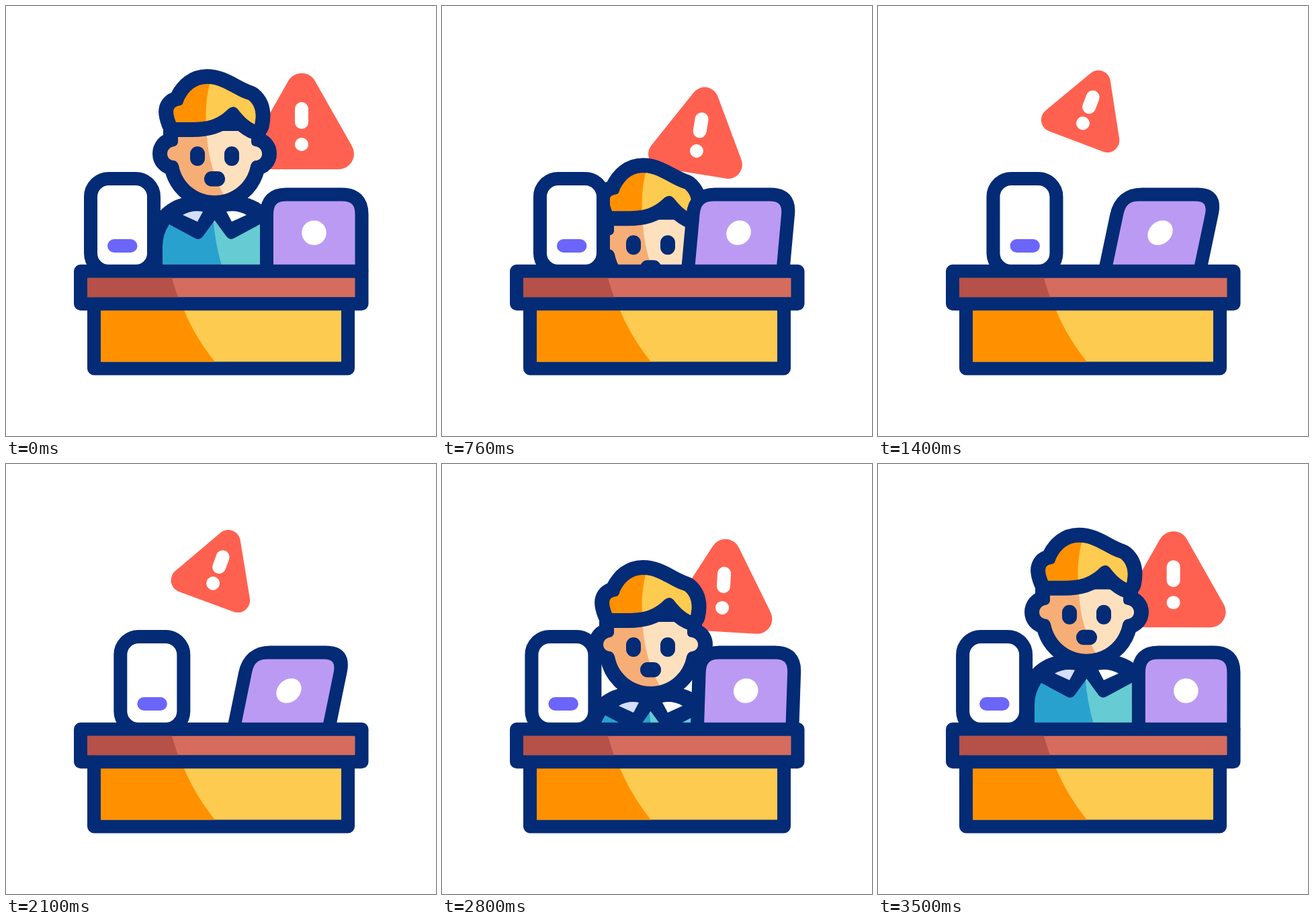
An HTML page that plays this animation: 640 px wide and 640 px high, repeating every 3600 ms.

```html
<!DOCTYPE html>
<html lang="en">
<head>
<meta charset="utf-8">
<title>Hiding behind the desk</title>
<style>
  html, body { margin: 0; width: 100%; height: 100%; overflow: hidden; background: #fff; }
  svg { display: block; width: 100vw; height: 100vh; }
  .navy { fill: #042b75; }
  .line { stroke: #042b75; stroke-width: 20; stroke-linejoin: round; }
  .thick { stroke: #042b75; stroke-width: 44; stroke-linejoin: round; }
</style>
</head>
<body>
<svg viewBox="0 0 640 640">
  <defs>
    <clipPath id="aboveDesk"><path d="M0 0H640V395H0Z"/></clipPath>
    <clipPath id="headLight"><path d="M305 90L303 116C296 145 297 170 299 195C302 230 311 258 325 283L420 290V90Z"/></clipPath>
    <clipPath id="bodyLight"><path d="M308 310Q310 350 322 390L326 405H420V310Z"/></clipPath>
    <path id="face" d="M256 186V203Q255 208 250 209C236.700 211 236.700 229 250 230Q255 231 257 237C262 264 285 282 310.500 282C336 282 359 264 364 237Q366 231 371 230C384.300 229 384.300 211 371 209Q365 208 365 203V186Z"/>
    <path id="hair" d="M253 173C248 160 247 152 255 149C262 147 262 149 265 140C272 126 283 116 299 116C322 116 338 133 361 140C372 149 373 162 370 176C362 172 354 165 347 156Q340 146 331 153C314 170 297 173 277 173Z"/>
    <path id="body" d="M233 405V358Q233 340 243 325L282 346Q288 349 293 343L310.500 319L328 343Q333 349 339 346L378 325Q388 340 388 358V405Z"/>
  </defs>

  <g id="alert">
    <path id="sign" fill="#ff6150" stroke="#ff6150" stroke-width="46" stroke-linejoin="round" d="M0-83L-55 14H55Z"/>
    <g stroke="#fff" stroke-width="20" stroke-linecap="round">
      <path id="bang"/>
      <circle r="10" fill="#fff" stroke="none"/>
    </g>
  </g>

  <g clip-path="url(#aboveDesk)">
    <g id="person">
      <path class="navy" d="M211 420V355C211 318 235 284 285 282H336C386 284 410 318 410 355V420Z"/>
      <use href="#body" fill="#29a1cf"/>
      <use href="#body" fill="#66cbd2" clip-path="url(#bodyLight)"/>
      <path fill="#d5deff" d="M263 311Q277 303 293 306L285 321Z"/>
      <path fill="#fff" d="M358 311Q344 303 328 306L336 321Z"/>
      <use href="#face" class="thick"/>
      <use href="#face" fill="#f6ae76"/>
      <use href="#face" fill="#fde0be" clip-path="url(#headLight)"/>
      <use href="#hair" class="thick"/>
      <use href="#hair" fill="#ff9100"/>
      <use href="#hair" fill="#fdcb50" clip-path="url(#headLight)"/>
      <g class="navy">
        <rect x="274" y="209" width="22" height="29" rx="11"/>
        <rect x="325" y="209" width="22" height="29" rx="11"/>
        <rect x="295" y="246" width="31" height="22.500" rx="11"/>
      </g>
    </g>
  </g>

  <g id="phone">
    <rect class="line" x="126" y="257" width="94" height="138" rx="27" fill="#fff"/>
    <rect x="151" y="347" width="44.500" height="20" rx="10" fill="#6b66f9"/>
  </g>

  <g id="laptop">
    <path class="line" fill="#bb9af3" d="M388 395V310Q388 280.500 417 280.500H500Q529.500 280.500 529.500 310V395"/>
    <circle cx="458.500" cy="337.500" r="18.300" fill="#fff"/>
  </g>

  <g>
    <rect class="line" x="131" y="443" width="378" height="96.500" fill="#fdcb50"/>
    <path fill="#ff9100" d="M141 453H265Q282 494 311 529.500H141Z"/>
    <rect class="line" x="111" y="394.700" width="418.500" height="48.500" fill="#d56c5d"/>
    <path fill="#b55148" d="M121 404.700H247Q251 420 256 433.200H121Z"/>
  </g>
</svg>
<script>
  const LOOP = 3600, TURN = 1652, BACK = 1994;
  const $ = id => document.getElementById(id);
  const [alertBox, sign, bang, person, phone, laptop] =
    ['alert', 'sign', 'bang', 'person', 'phone', 'laptop'].map($);
  const move = (el, value) => el.setAttribute('transform', value);

  // Cubic bezier timing (.82, 0, .1, 1), solved by bisection
  function ease(x) {
    let lo = 0, hi = 1, s = 0.5;
    for (let i = 0; i < 30; i++) {
      s = (lo + hi) / 2;
      const r = 1 - s;
      if (2.46 * s * r * r + 0.3 * s * s * r + s * s * s < x) lo = s;
      else hi = s;
    }
    return s * s * (3 - 2 * s);
  }

  function draw(t) {
    const p = t < TURN ? ease(t / TURN) : 1 - ease((t - TURN) / BACK);
    move(person, `translate(0 ${305 * p})`);
    move(phone, `translate(${46 * p} 0)`);
    move(laptop, `translate(${-49 * p} 385) skewX(${-12 * p}) translate(0 -385)`);

    const x = 440 - 144 * p + 7.5 * p * p;
    const y = 206 + 65 * p - 98 * p * p;
    const k = 1 - 0.22 * p;
    move(alertBox, `translate(${x} ${y}) rotate(${21 * p})`);
    move(sign, `scale(${k})`);
    bang.setAttribute('d', `M0 ${-53 * k}V${-33 * k}`);
  }

  const start = performance.now();
  function tick() {
    draw((performance.now() - start) % LOOP);
    requestAnimationFrame(tick);
  }
  draw(0);
  requestAnimationFrame(tick);
</script>
</body>
</html>
```
